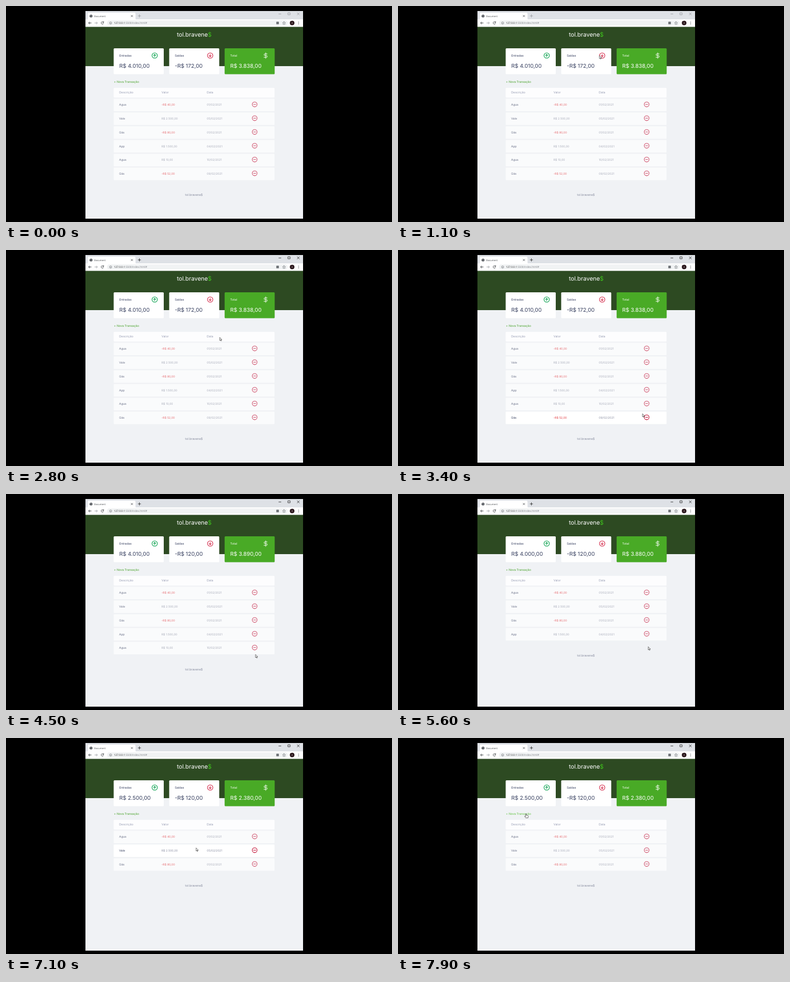
These frames come from a looping animation (690 by 388 pixels, 8000 ms). An HTML page:

```html
<!DOCTYPE html>
<html lang="pt-BR">
<head>
<meta charset="utf-8">
<title>Document</title>
<style>
  html, body { margin: 0; width: 100%; height: 100%; overflow: hidden; background: #000; }
  svg { display: block; width: 690px; height: 388px; }
  text { font-family: Inter, sans-serif; text-rendering: geometricPrecision; }
  .ui { font-family: "Open Sans", sans-serif; }
  .line { fill: none; stroke-linecap: round; stroke-linejoin: round; }
</style>
</head>
<body>
<svg id="stage" viewBox="0 0 690 388" xmlns="http://www.w3.org/2000/svg"></svg>
<script>
const LOOP = 8000, STEP = 100;
const ROW_TOP = 166.5, ROW_H = 22.4, PITCH = 24.75;
const DARK = '#363f5f', RED = '#e02f35', CRIMSON = '#c4183c';
const stage = document.getElementById('stage');

const entries = [
  ['Agua', -40, '01/02/2021'],
  ['Vale', 2500, '05/02/2021'],
  ['Gás', -80, '01/02/2021'],
  ['App', 1500, '04/02/2021'],
  ['Agua', 10, '10/02/2021'],
  ['Gás', -52, '09/02/2021']
];
const removals = [4000, 5200, 6700];
const ACTIVE_AT = 1600;

// pointer path: time, x, y
const path = [
  [800, 505, 185], [1100, 360, 89], [1300, 263, 85], [1550, 263, 85],
  [2000, 362, 89], [2400, 458, 92], [2800, 382, 157], [3300, 437, 294],
  [3400, 437, 294], [3800, 443, 299], [4200, 443, 299], [4500, 446, 288.3],
  [4700, 448, 277], [4900, 448, 277], [5000, 447.6, 276], [5500, 447.6, 276],
  [6100, 443.5, 254], [6650, 443.5, 254], [7500, 253, 150], [7900, 229, 136]
];

function el(tag, attrs, parent = stage, content) {
  const node = document.createElementNS('http://www.w3.org/2000/svg', tag);
  for (const k in attrs) node.setAttribute(k, attrs[k]);
  if (content !== undefined) node.textContent = content;
  parent.appendChild(node);
  return node;
}
const box = (x, y, width, height, fill, rx = 0, parent = stage) =>
  el('rect', { x, y, width, height, fill, rx }, parent);
const label = (x, y, size, fill, str, parent = stage, more = {}) =>
  el('text', { x, y, 'font-size': size, fill, ...more }, parent, str);
const line = (d, stroke, width, parent = stage) =>
  el('path', { d, stroke, 'stroke-width': width, class: 'line' }, parent);
const ring = (cx, cy, r, stroke, width, parent = stage) =>
  el('circle', { cx, cy, r, fill: 'none', stroke, 'stroke-width': width }, parent);
const dot = (cx, cy, r, fill) => el('circle', { cx, cy, r, fill });

function money(v) {
  const digits = String(Math.abs(v)).replace(/\B(?=(\d{3})+$)/g, '.');
  return (v < 0 ? '-' : '') + 'R$ ' + digits + ',00';
}

// browser window
box(142, 9, 389, 373, '#f0f2f5');
box(142, 9, 389, 16, '#dee1e6');
el('path', { d: 'M144 24.5q2 0 2-2V14q0-2 2-2H229.500q2 0 2 2V22.500q0 2 2 2Z', fill: '#fff' });
box(142, 24, 389, 13.5, '#fff');
dot(152, 18, 2.6, '#4d5156');
line('M150.400 17h2l.8 1.400M151.500 19.500l1 .6', '#c8cacd', .6);
label(157.5, 19.6, 4.2, '#3c4043', 'Document', stage, { class: 'ui' });
line('M223.700 16.600l2.800 2.800m0-2.800l-2.800 2.800', '#3c4043', .7);
const controls = el('g', { 'stroke-width': .8, class: 'line' });
for (const d of [
  'M236.200 17.800h4.600m-2.300-2.300v4.600', 'M487.700 14.300h3.800',
  'M504.300 12.200h3.600v3.600h-3.600Z', 'M520.600 12.200l3.800 3.800m0-3.800l-3.800 3.800'
]) el('path', { d }, controls);

line('M152.300 30.500h-4.600m2-2l-2 2 2 2', '#4a4d51', .9);
line('M158.700 30.500h4.600m-2-2l2 2-2 2', '#a9acb0', .9);
line('M174.200 29.200a2.200 2.200 0 1 0 .2 2M174.600 27.900v1.700h-1.700', '#4a4d51', .9);
box(180.5, 25.7, 323, 9.6, '#f1f3f4', 4.8);
ring(187, 30.5, 2, '#5f6368', .6);
line('M187 30.400v1', '#5f6368', .6);
const url = label(193, 32.1, 4.65, '#202124', '127.0.0.1', stage, { class: 'ui' });
el('tspan', { fill: '#777b80' }, url, ':5500/index.html#');
box(483.2, 28.2, 4.6, 4.6, '#6c7075', .6);
line('M497 28l.8 1.700 1.900.2-1.400 1.300.4 1.900-1.700-1-1.700 1 .4-1.900-1.400-1.300 1.900-.2Z', '#5f6368', .6);
dot(511.5, 30.5, 4.1, '#2a171c');
label(511.5, 32, 4, '#e9dfe1', 'A', stage, { class: 'ui', 'text-anchor': 'middle' });
for (const y of [28.6, 30.5, 32.4]) dot(523, y, .6, '#4a4d51');

// page header
box(142, 37.5, 389, 70.5, '#2d4a22');
const brand = label(336.5, 55, 10.5, '#fff', 'tol.bravene', stage, { 'text-anchor': 'middle' });
el('tspan', { fill: '#3fc41c' }, brand, '$');

function card(x, title, fill, ink) {
  box(x, 76, 89.5, 46.5, fill, 1.5);
  label(x + 10, 91, 5.3, ink, title);
  return label(x + 10, 110.7, 9.7, ink, '');
}
const income = card(192.5, 'Entradas', '#fff', DARK);
const expense = card(291.7, 'Saídas', '#fff', DARK);
const total = card(390.8, 'Total', '#49aa26', '#fff');
ring(265.8, 89, 4.8, '#12a454', 1.1);
line('M265.800 91.200v-4.400m-2 2l2-2 2 2', '#12a454', 1.1);
ring(365, 89, 4.8, '#d5304f', 1.1);
line('M365 86.800v4.400m-2-2l2 2 2-2', '#d5304f', 1.1);
line('M464.200 84v10.200M466.900 86h-4a1.550 1.550 0 0 0 0 3.100h2.600a1.550 1.550 0 0 1 0 3.100h-4.400', '#fff', .9);

const link = label(193, 137.8, 5.2, '', '+ Nova Transação');

// table
box(192.5, 147, 287.5, 17.6, '#fdfdfe', 1.5);
[[202.3, 'Descrição'], [278, 'Valor'], [359, 'Data']]
  .forEach(([x, s]) => label(x, 157.3, 5.3, '#969cb3', s));

const rows = entries.map(([name, value, date], i) => {
  const g = el('g', {}), y = ROW_TOP + i * PITCH, base = y + 12.9;
  box(192.5, y, 287.5, ROW_H, '#fff', 1.2, g);
  label(202.3, base, 5.2, DARK, name, g);
  label(278, base, 5, value < 0 ? RED : '#868b9f', money(value), g);
  label(359, base, 5.05, '#868b9f', date, g);
  ring(444.5, y + 10.3, 4.3, CRIMSON, 1.1, g);
  line(`M442.500 ${y + 10.3}h4`, CRIMSON, 1.1, g);
  return g;
});
const footer = label(336, 0, 5.3, '#82879b', 'tol.bravene$', stage, { 'text-anchor': 'middle' });

// pointers, both with the hot spot at 0,0
const arrow = el('path', {
  d: 'M0 0V5.600L1.300 4.400 2.200 6.400 3.100 6 2.200 4.100H4Z',
  fill: '#fff', stroke: '#222', 'stroke-width': .6, 'stroke-linejoin': 'round'
});
const hand = el('path', {
  d: 'M-.7 .4Q0-.5 .7 .4V2.700L3.300 3.300Q4 3.500 3.900 4.500L3.300 7.500H-.7L-2.700 4.700Q-2.500 3.700-1.600 4.200L-.7 5Z',
  fill: '#fff', stroke: '#222', 'stroke-width': .6, 'stroke-linejoin': 'round'
});

function pointerAt(t) {
  if (t < path[0][0]) return null;
  const i = path.findIndex(p => p[0] > t);
  if (i < 0) return path[path.length - 1].slice(1);
  const [t0, x0, y0] = path[i - 1], [t1, x1, y1] = path[i];
  const u = (t - t0) / (t1 - t0), k = u * u * (3 - 2 * u);
  return [x0 + (x1 - x0) * k, y0 + (y1 - y0) * k];
}

function draw(ms) {
  const t = Math.floor(ms % LOOP / STEP) * STEP;
  const count = entries.length - removals.filter(r => t >= r).length;
  const values = entries.slice(0, count).map(e => e[1]);
  const sum = keep => values.filter(keep).reduce((a, b) => a + b, 0);
  income.textContent = money(sum(v => v > 0));
  expense.textContent = money(sum(v => v < 0));
  total.textContent = money(sum(() => true));

  const pos = pointerAt(t);
  const [x, y] = pos || [-50, -50];
  rows.forEach((g, i) => {
    const top = ROW_TOP + i * PITCH;
    const over = x > 192.5 && x < 480 && y >= top && y < top + ROW_H;
    g.setAttribute('opacity', over ? 1 : .7);
    g.setAttribute('visibility', i < count ? 'visible' : 'hidden');
  });
  footer.setAttribute('y', 341.3 - (entries.length - count) * PITCH);

  const onLink = x > 193 && x < 239 && y > 131 && y < 140;
  link.setAttribute('fill', onLink ? '#5cc23a' : '#43a024');
  controls.setAttribute('stroke', t >= ACTIVE_AT ? '#222' : '#96999d');
  for (const [node, on] of [[arrow, pos && !onLink], [hand, onLink]]) {
    node.setAttribute('transform', `translate(${x} ${y})`);
    node.setAttribute('visibility', on ? 'visible' : 'hidden');
  }
}

const start = performance.now();
function tick() {
  draw(performance.now() - start);
  requestAnimationFrame(tick);
}
tick();
</script>
</body>
</html>
```
